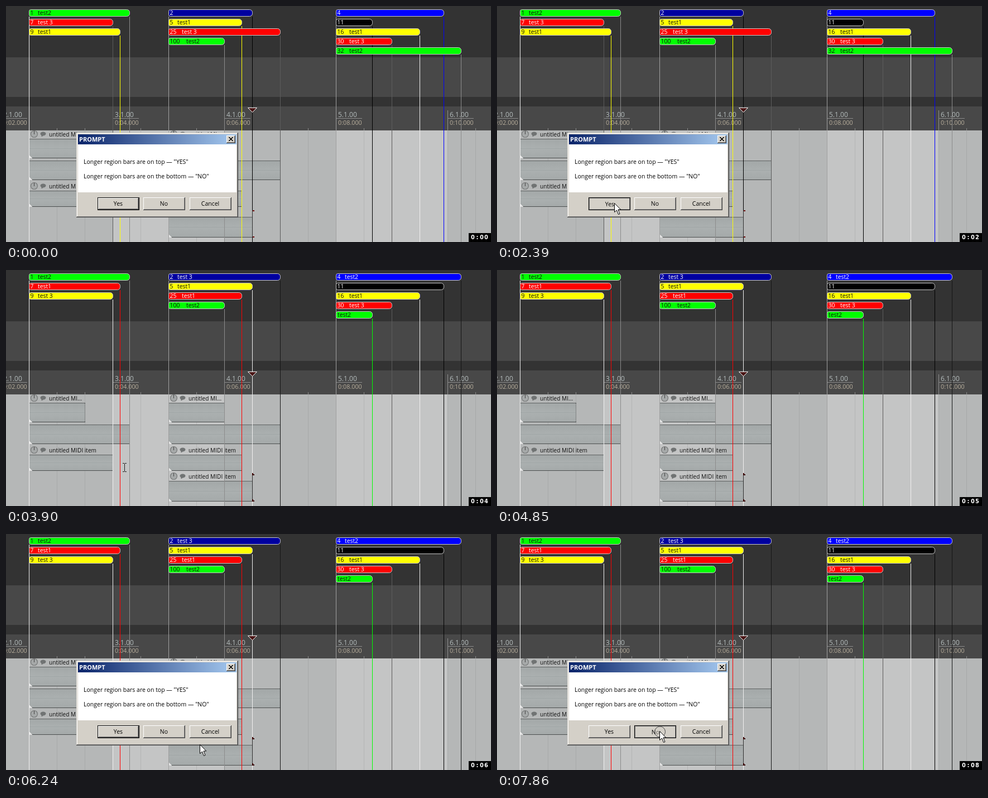
An HTML page with a canvas for the animation above (8 s loop, 869 by 423 pixels).

```html
<!DOCTYPE html>
<html lang="en">
<head>
<meta charset="utf-8">
<title>Region bars prompt</title>
<style>
  html, body { margin: 0; width: 100%; height: 100%; overflow: hidden; background: #333; }
  canvas { display: block; }
</style>
</head>
<body>
<canvas id="stage" width="869" height="423"></canvas>
<script>
const ctx = document.getElementById('stage').getContext('2d');
const LOOP = 8000;
const FACE = '"Open Sans", "Noto Sans", sans-serif';
const GREEN = '#00ff00', RED = '#ff0000', YELLOW = '#ffff00', NAVY = '#0000a0',
      BLUE = '#0000ff', BLACK = '#000', GRAY = '#8c8c8c', DIM = '#5c5c5c', WHITE = '#f0f0f0';

// Each bar: end x, number, name, colour of its end line
const groups = [
  { x: 41, edge: WHITE, fills: [GREEN, RED, YELLOW] },
  { x: 291, edge: '#a0a0a0', fills: [NAVY, YELLOW, RED, GREEN] },
  { x: 591, edge: '#a0a0a0', fills: [BLUE, BLACK, YELLOW, RED, GREEN] }
];
const before = [
  [[222, '1', 'test2', GRAY], [192, '7', 'test 3', DIM], [205, '9', 'test1', YELLOW]],
  [[442, '2', '', BLACK], [423, '5', 'test1', YELLOW], [492, '25', 'test 3', DIM], [392, '100', 'test2', GRAY]],
  [[785, '4', '', BLUE], [657, '11', '', BLACK], [742, '16', 'test1', WHITE], [692, '30', 'test 3', DIM], [816, '32', 'test2', GRAY]]
];
const after = [
  [[222, '1', 'test2', GRAY], [205, '7', 'test1', RED], [192, '9', 'test 3', WHITE]],
  [[492, '2', 'test 3', '#161616'], [442, '5', 'test1', WHITE], [423, '25', 'test1', RED], [392, '100', 'test2', GRAY]],
  [[816, '4', 'test2', '#161616'], [785, '11', '', BLACK], [742, '16', 'test1', WHITE], [692, '30', 'test 3', DIM], [657, '', 'test2', GREEN]]
];

// Pointer: start time, shape, x, y
const pointer = [
  [0, ''],
  [430, 'arrow', 221, 387], [550, 'arrow', 213, 366], [670, 'arrow', 210, 358], [820, 'arrow', 210, 353],
  [2510, 'beam', 212, 346], [4050, 'beam', 212, 354], [4170, ''],
  [6090, 'arrow', 341, 397], [6240, 'arrow', 347, 377], [6360, 'arrow', 346, 361],
  [6510, 'arrow', 311, 352], [6630, 'arrow', 297, 349], [6780, 'arrow', 292, 349],
  [6880, 'arrow', 291, 351], [7000, 'arrow', 291, 353]
];
const seconds = [970, 1830, 2940, 3900, 4850, 5810, 6880, 7860];

function rect(x, y, w, h, color) {
  ctx.fillStyle = color;
  ctx.fillRect(x, y, w, h);
}

function text(str, x, y, color, size = 10.4, align = 'left', weight = '400') {
  ctx.font = `${weight} ${size}px ${FACE}`;
  ctx.textAlign = align;
  ctx.fillStyle = color;
  ctx.fillText(str, x, y);
}

function poly(points, fill, stroke) {
  ctx.beginPath();
  points.forEach(([x, y]) => ctx.lineTo(x, y));
  ctx.closePath();
  ctx.fillStyle = fill;
  ctx.fill();
  ctx.strokeStyle = stroke;
  ctx.lineWidth = 1;
  ctx.stroke();
}

// One-pixel frame: top and left in one colour, bottom and right in another
function bevel(x, y, w, h, light, dark) {
  rect(x, y, w, 1, light);
  rect(x, y, 1, h, light);
  rect(x, y + h - 1, w, 1, dark);
  rect(x + w - 1, y, 1, h, dark);
}

function drawBackdrop() {
  rect(0, 0, 869, 423, '#333333');
  rect(0, 92, 869, 71, '#484848');
  rect(0, 180, 869, 43, '#484848');
  for (let x = -9, i = 0; x < 869; x += 200, i++) {
    rect(x, 223, 200, 200, i % 2 ? '#c4c5c5' : '#b5b7b7');
    rect(x, 187, 1, 36, '#909090');
    rect(x, 201, 47, 1, '#8a8a8a');
    text(`${i + 2}.1.00`, x + 4, 199, '#b4bcbc', 12);
    text(`0:${String(i * 2 + 2).padStart(2, '0')}.000`, x + 4, 212.5, '#b8ae9c', 10.8);
  }
  for (let x = 41; x < 869; x += 50) {
    rect(x, 219, 1, 4, '#8c8c8c');
    rect(x, 223, 1, 200, 'rgba(120,125,125,.22)');
  }
}

function drawItem(x, head, top, end, bottom, label) {
  const w = end - x, h = bottom - top;
  const shade = ctx.createLinearGradient(0, top, 0, bottom);
  shade.addColorStop(0, '#a2a7a7');
  shade.addColorStop(.5, '#abb0b0');
  shade.addColorStop(1, '#a4a9a9');
  rect(x, top, w, h, shade);
  rect(x, top + h / 2 | 0, w, 1, '#a0a6a6');
  bevel(x, top, w, h, '#606363', '#4c4f4f');
  poly([[x + .5, bottom - 5.5], [x + .5, bottom - .5], [x + 5.5, bottom - .5]], '#e8e8e8', '#e0e0e0');
  if (!label) return;
  const cx = x + 9.5, cy = head + 6.5;
  ctx.beginPath();
  ctx.arc(cx, cy, 6, 0, Math.PI * 2);
  ctx.fillStyle = '#a6a9a9';
  ctx.fill();
  ctx.strokeStyle = '#777979';
  ctx.lineWidth = 1.2;
  ctx.stroke();
  rect(x + 9, head + 1, 1, 6, '#444');
  ctx.beginPath();
  ctx.ellipse(x + 25.5, head + 6, 5, 3.4, 0, 0, Math.PI * 2);
  ctx.fillStyle = '#707373';
  ctx.fill();
  poly([[x + 23, head + 8], [x + 26, head + 8.5], [x + 23, head + 11]], '#707373', '#707373');
  text(label, x + 36, head + 11, '#101010', 10.1);
}

function drawItems(changed) {
  const long = 'untitled MIDI item', short = 'untitled MI...';
  drawItem(41, 223, 238, 142, 273, short);
  drawItem(41, 0, 277, 222, 312);
  drawItem(41, 316, 331, 192, 360, long);
  drawItem(291, 223, 238, 392, 273, short);
  drawItem(291, 0, 277, 492, 312);
  drawItem(291, 316, 331, 423, 360, long);
  drawItem(291, 363, 378, 442, 415, long);
  for (let y = 240; y < 272; y += 2) rect(141, y, 1, 1, '#b5b7b7');
}

function drawLines(bars) {
  groups.forEach((g, i) => {
    rect(g.x, 19, 1, 404, g.edge);
    bars[i].forEach(([end, , , color], row) => {
      const y = 19 + row * 17;
      rect(end - 1, y, 1, 423 - y, color);
    });
  });
}

function drawBars(bars) {
  groups.forEach((g, i) => bars[i].forEach(([end, num, name], row) => {
    const y = 6 + row * 17, fill = g.fills[row];
    const ink = fill === GREEN || fill === YELLOW ? '#101010' : '#fff';
    ctx.beginPath();
    ctx.roundRect(g.x + .5, y + .5, end - g.x - 1, 12, [3, 5, 5, 3]);
    ctx.fillStyle = fill;
    ctx.fill();
    ctx.strokeStyle = '#c8c8c8';
    ctx.lineWidth = 1;
    ctx.stroke();
    text(num, g.x + 2.5, y + 10, ink);
    text(name, g.x + (num ? 8 + num.length * 8 : 3), y + 10, ink);
  }));
}

function drawMarks(changed) {
  poly([[433.5, 182.5], [449.5, 182.5], [441.5, 190.5]], '#4a1515', '#f4f4f4');
  const color = changed ? '#3a0000' : '#700000';
  rect(441, 366, 1, 49, '#303030');
  rect(442, 366, 3, 2, color);
  rect(442, 413, 3, 2, color);
  if (changed) {
    rect(441, 364, 2, 4, color);
    rect(441, 411, 2, 4, color);
  }
}

function drawButton(label, x, state) {
  const y = 343, w = 75, h = 23;
  rect(x, y, w, h, '#d4d0c8');
  if (state === 'pressed') {
    bevel(x, y, w, h, '#000', '#000');
    bevel(x + 1, y + 1, w - 2, h - 2, '#808080', '#808080');
  } else {
    const d = state === 'default' ? 1 : 0;
    if (d) bevel(x, y, w, h, '#000', '#000');
    bevel(x + d, y + d, w - 2 * d, h - 2 * d, '#fff', '#404040');
    rect(x + d + 1, y + h - d - 2, w - 2 * d - 2, 1, '#808080');
    rect(x + w - d - 2, y + d + 1, 1, h - 2 * d - 2, '#808080');
  }
  const shift = state === 'pressed' ? 1 : 0;
  text(label, x + 37 + shift, 358 + shift, '#000', 10.5, 'center');
}

function drawDialog(t) {
  rect(126, 227, 290, 152, '#d4d0c8');
  bevel(126, 227, 290, 152, '#d4d0c8', '#404040');
  bevel(127, 228, 288, 150, '#fff', '#808080');
  const blue = ctx.createLinearGradient(129, 0, 413, 0);
  blue.addColorStop(0, '#0a246a');
  blue.addColorStop(1, '#a6caf0');
  rect(129, 230, 284, 18, blue);
  text('PROMPT', 131, 243, '#fff', 11, 'left', '700');

  rect(395, 232, 16, 14, '#d4d0c8');
  bevel(395, 232, 16, 14, '#fff', '#404040');
  rect(396, 244, 14, 1, '#808080');
  rect(409, 233, 1, 12, '#808080');
  for (let i = 0; i < 7; i++) {
    rect(399 + i, 235 + i, 2, 1, '#000');
    rect(405 - i, 235 + i, 2, 1, '#000');
  }

  rect(129, 248, 284, 86, '#fff');
  text('Longer region bars are on top \u2014 "YES"', 139, 283, '#000', 10.5);
  text('Longer region bars are on the bottom \u2014 "NO"', 139, 309, '#000', 10.5);

  const yesDown = t >= 1280 && t < 2510, noDown = t >= 7400;
  drawButton('Yes', 164, yesDown ? 'pressed' : noDown ? '' : 'default');
  drawButton('No', 246, noDown ? 'pressed' : '');
  drawButton('Cancel', 329, '');
}

function drawClick(x, y) {
  ctx.beginPath();
  ctx.arc(x, y, 9.5, 0, Math.PI * 2);
  ctx.fillStyle = 'rgba(212,208,200,.45)';
  ctx.fill();
  ctx.strokeStyle = '#484848';
  ctx.lineWidth = 1;
  ctx.stroke();
}

function drawPointer([, shape, x, y]) {
  if (shape === 'arrow') {
    const outline = [[0, 0], [0, 16], [4, 12.5], [7, 20], [9.5, 19], [6.5, 11.5], [11.3, 11.5]];
    poly(outline.map(([a, b]) => [x + a + .5, y + b + .5]), '#fff', '#000');
  } else if (shape === 'beam') {
    rect(x, y + 1, 1, 14, '#202020');
    for (const row of [y, y + 15]) {
      rect(x - 3, row, 3, 1, '#202020');
      rect(x + 1, row, 3, 1, '#202020');
    }
  }
}

function drawClock(t) {
  const count = seconds.filter(s => t >= s).length;
  rect(829, 407, 40, 16, '#000');
  ctx.font = 'bold 9.8px "DejaVu Sans", sans-serif';
  ctx.textAlign = 'center';
  ctx.fillStyle = '#fff';
  [...`0:0${count}`].forEach((c, i) => ctx.fillText(c, 836.5 + i * 8, 418));
}

function draw(t) {
  const changed = t >= 2510;
  const bars = changed ? after : before;
  drawBackdrop();
  drawItems();
  drawLines(bars);
  drawBars(bars);
  drawMarks(changed);
  if (!changed || t >= 5530) drawDialog(t);
  if (t >= 1280 && t < 2390) drawClick(211, 354.5);
  if (t >= 7400) drawClick(292, 354.5);
  drawPointer(pointer.filter(p => t >= p[0]).pop());
  drawClock(t);
}

const start = performance.now();
function tick() {
  draw((performance.now() - start) % LOOP);
  requestAnimationFrame(tick);
}
tick();
</script>
</body>
</html>
```
